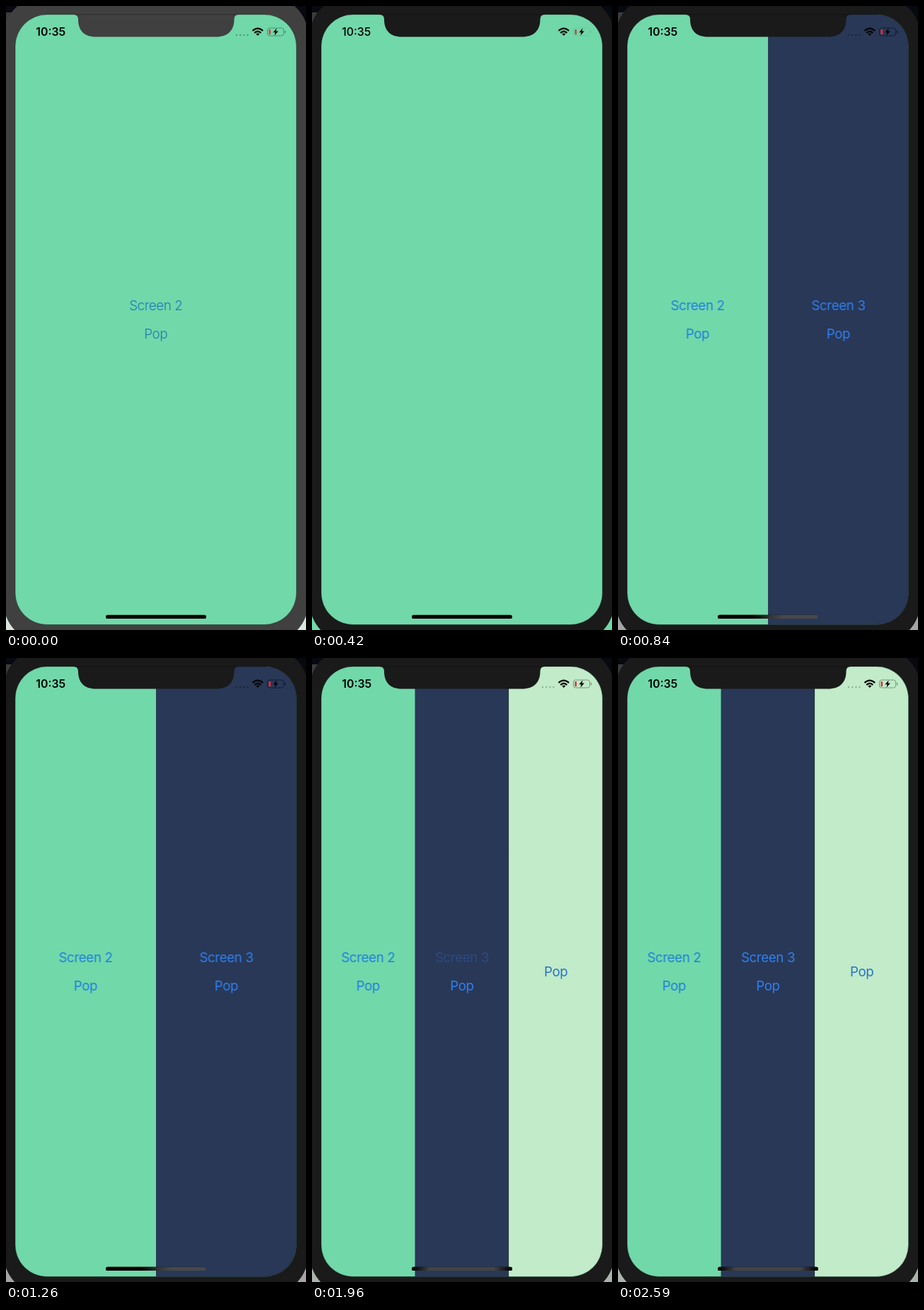
An HTML page that plays this animation: 424x880 px, repeating every 2660 ms.

```html
<!DOCTYPE html>
<html lang="en">
<head>
<meta charset="utf-8">
<title>Screen stack</title>
<style>
  html, body { margin: 0; width: 100%; height: 100%; overflow: hidden; background: #060910; }
  svg { display: block; width: 424px; height: 880px; }
  text { font-family: Inter, Roboto, sans-serif; }
  .labels text { font-size: 18.7px; letter-spacing: -.35px; text-anchor: middle; }

  /* Hard changes; every animation shares the same loop */
  .bezel, .corner, .clock, .labels, .navy, .pale, .dots, .case, .charge, .bar-two, .bar-three {
    animation: 2660ms step-end infinite;
  }
  .bezel { animation-name: bezel; }
  .corner { animation-name: corner; }
  .clock { animation-name: clock; font-size: 15.8px; }
  .dots { animation-name: dots; }
  .case { animation-name: case; }
  .charge { animation-name: charge; }
  .navy { animation-name: navy; }
  .pale { animation-name: pale; }
  .second { animation-name: second; }
  .third { animation-name: third; fill: #2e80f2; }
  .bar-two { animation-name: bar-two; }
  .bar-three { animation-name: pale; }
  .press-two { animation: press-two 2660ms step-end infinite; }
  .press-three { animation: press-three 2660ms step-end infinite; }

  @keyframes bezel { 0% { fill: #404040; } 7.89%, 100% { fill: #1a1a1a; } }
  @keyframes corner {
    0% { fill: #d9e5dd; }
    7.89% { fill: #71d8a9; }
    18.42% { fill: #a5a5a8; }
    73.68%, 100% { fill: #a9b5ac; }
  }
  @keyframes clock { 0% { font-weight: 600; } 7.89% { font-weight: 500; } 18.42%, 100% { font-weight: 600; } }
  @keyframes dots {
    0% { fill: #4f9b79; }
    7.89% { fill: #71d8a9; }
    18.42% { fill: #1b263e; }
    73.68%, 100% { fill: #93b49a; }
  }
  @keyframes case {
    0% { stroke: #4a9272; }
    7.89% { stroke: #6ac99e; }
    18.42% { stroke: #131c2f; }
    73.68%, 100% { stroke: #7b9881; }
  }
  @keyframes charge {
    0% { fill: #cf4d45; }
    7.89% { fill: #a8564a; }
    18.42% { fill: #ee2737; }
    73.68%, 100% { fill: #c8433b; }
  }
  @keyframes navy {
    0% { opacity: 0; transform: translateX(212px); }
    18.42% { opacity: 1; transform: translateX(212px); }
    73.68%, 100% { opacity: 1; transform: translateX(145.5px); }
  }
  @keyframes pale { 0% { opacity: 0; } 73.68%, 100% { opacity: 1; } }
  @keyframes second {
    0% { transform: translateX(211.8px); fill: #1c76b8; font-weight: 300; opacity: 1; }
    7.89% { transform: translateX(211.8px); opacity: 0; }
    18.42% { transform: translateX(112.5px); fill: #1f7de0; font-weight: 400; opacity: 1; }
    73.68%, 100% { transform: translateX(79.3px); fill: #1f7de0; font-weight: 400; opacity: 1; }
  }
  @keyframes third {
    0% { opacity: 0; transform: translateX(311.4px); }
    18.42% { opacity: 1; transform: translateX(311.4px); }
    73.68%, 100% { opacity: 1; transform: translateX(212px); }
  }
  @keyframes bar-two { 0% { opacity: 0; } 18.42% { opacity: 1; } 73.68%, 100% { opacity: 0; } }

  /* Press dims a label, release brings it back */
  @keyframes press-two {
    0% { opacity: 1; }
    5.26% { opacity: .6; }
    7.89% { opacity: .25; }
    18.42% { opacity: .25; animation-timing-function: steps(3); }
    26.31%, 100% { opacity: 1; }
  }
  @keyframes press-three {
    0% { opacity: 1; }
    60.52% { opacity: .85; }
    63.15% { opacity: .4; }
    65.78% { opacity: .18; }
    73.68% { opacity: .27; animation-timing-function: steps(3); }
    81.57%, 100% { opacity: 1; }
  }
</style>
</head>
<body>
<svg viewBox="0 0 424 880">
  <defs>
    <clipPath id="screen"><rect x="13" y="12" width="397.5" height="860.5" rx="45"/></clipPath>
    <linearGradient id="half">
      <stop offset=".35" stop-color="#000"/>
      <stop offset=".52" stop-color="#333"/>
      <stop offset=".65" stop-color="#484848"/>
    </linearGradient>
    <linearGradient id="middle">
      <stop offset=".04" stop-color="#0c0c0c"/>
      <stop offset=".18" stop-color="#444"/>
      <stop offset=".82" stop-color="#444"/>
      <stop offset=".96" stop-color="#0c0c0c"/>
    </linearGradient>
  </defs>

  <rect width="424" height="880" fill="#060910"/>
  <rect y="9" width="20" height="20" fill="#3c3c3e"/>
  <rect class="corner" y="840" width="424" height="40"/>
  <rect class="bezel" x="-3" y="-13" width="430" height="910" rx="55"/>

  <g clip-path="url(#screen)">
    <rect width="424" height="880" fill="#71d8a9"/>
    <rect class="navy" width="424" height="880" fill="#293857"/>
    <g class="pale">
      <rect x="277.8" width="147" height="880" fill="#c1ebc9"/>
      <path d="M277.6 12V873" stroke="#1c3438"/>
    </g>

    <g class="labels second">
      <text class="press-two" y="429.3">Screen 2</text>
      <text y="469.3">Pop</text>
    </g>
    <g class="labels third">
      <text class="press-three" y="429.3">Screen 3</text>
      <text y="469.3">Pop</text>
    </g>
    <g class="labels pale" fill="#2a72c4">
      <text x="344.7" y="449.3">Pop</text>
    </g>

    <path class="bezel" d="M95 11V12Q102 12 102 19C102 35 111 43.5 127 43.5H297C313 43.5 322.5 35 322.5 19Q322.5 12 329 12V11Z"/>
  </g>
  <rect x="13" y="12" width="397.5" height="860.5" rx="45" fill="none" stroke="#000" stroke-opacity=".35"/>

  <text class="clock" x="42.3" y="42">10:35</text>
  <g class="dots">
    <circle cx="326" cy="41" r="1.2"/>
    <circle cx="331.2" cy="41" r="1.2"/>
    <circle cx="336.4" cy="41" r="1.2"/>
    <circle cx="341.4" cy="41" r="1.2"/>
  </g>
  <g fill="none" stroke="#000" stroke-width="2.3">
    <path d="M348.5 35Q355.8 28.2 363.1 35"/>
    <path d="M351.2 38Q355.8 33.6 360.4 38"/>
    <path d="M353.3 39.5Q355.8 37.6 358.3 39.5L355.8 42Z" fill="#000" stroke="none"/>
  </g>
  <g class="case" fill="none">
    <rect x="369.5" y="31" width="23" height="11" rx="3"/>
    <path d="M394.5 34.8V38.4" stroke-width="1.4"/>
  </g>
  <rect class="charge" x="371.4" y="33" width="2.7" height="7.2" rx=".8"/>
  <path d="M382.6 31.2L377.4 37.3H380.5L379.4 41.8L384.8 35.6H381.6Z"/>

  <rect x="141" y="858.8" width="142" height="5.2" rx="2.6"/>
  <rect class="bar-two" x="141" y="858.8" width="142" height="5.2" rx="2.6" fill="url(#half)"/>
  <rect class="bar-three" x="141" y="858.8" width="142" height="5.2" rx="2.6" fill="url(#middle)"/>
</svg>
</body>
</html>
```
